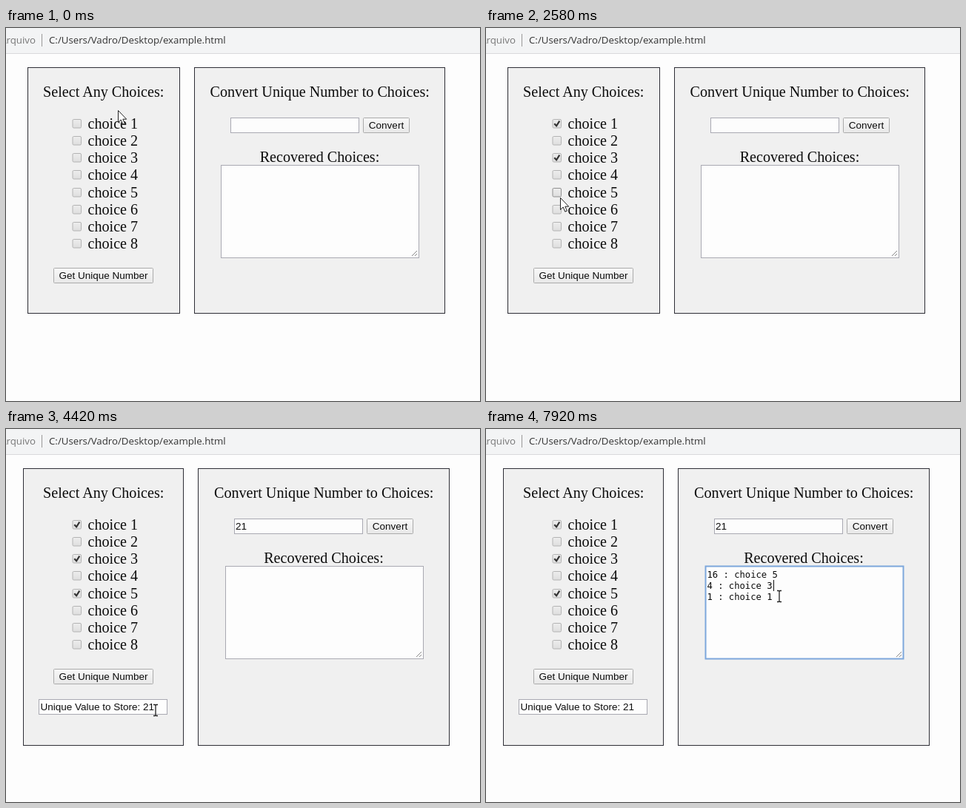
Recreate the animation shown at these times as an HTML page. Size 640x504 px, loop 8000 ms.

```html
<!DOCTYPE html>
<html lang="en">
<head>
<meta charset="utf-8">
<title>Unique number for choices</title>
<style>
  html, body { margin: 0; width: 100%; height: 100%; overflow: hidden; background: #fdfdfd; }
  svg { display: block; width: 640px; height: 504px; }
  text { white-space: pre; fill: #0c0c0c; }
  .serif { font: 20.15px "Liberation Serif", "Times New Roman", serif; }
  .sans { font: 13.5px "Liberation Sans", Arial, sans-serif; }
  .bar { font: 13.25px "Open Sans", "Noto Sans", sans-serif; fill: #333; }
  .mono { font: 12.2px "DejaVu Sans Mono", monospace; }
  .mid { text-anchor: middle; }
  .panel { fill: #f0f0f0; stroke: #2e2e36; }
  .field { fill: #fdfdfd; stroke: #a9a9b2; }
  .field.focus { stroke: #7da7dc; stroke-width: 2; }
  .button { fill: url(#face); stroke: #ababab; }
  .button.hover { stroke: #777; }
  .button.down { fill: #e2e2e2; }
  .box { fill: url(#boxFace); stroke: #b3b3b3; }
  .box.hover { stroke: #8f8f8f; }
  .box.down { fill: #d4d4d4; }
  .tick { fill: none; stroke: #333; stroke-width: 2.2; }
</style>
</head>
<body>
<svg id="stage" viewBox="0 0 640 504" xmlns="http://www.w3.org/2000/svg">
  <defs>
    <linearGradient id="face" x2="0" y2="1">
      <stop stop-color="#f8f8f8"/><stop offset="1" stop-color="#e8e8e8"/>
    </linearGradient>
    <linearGradient id="boxFace" x2="0" y2="1">
      <stop stop-color="#ededed"/><stop offset="1" stop-color="#dedede"/>
    </linearGradient>
  </defs>
</svg>
<script>
const LOOP = 8000, TICK = 1000 / 12;
const stage = document.getElementById('stage');

function add(parent, tag, attrs, content) {
  const node = document.createElementNS(stage.namespaceURI, tag);
  for (const key in attrs) node.setAttribute(key, attrs[key]);
  if (content) node.textContent = content;
  parent.append(node);
  return node;
}
const group = (parent = stage) => add(parent, 'g', {});
const text = (parent, x, y, style, content) => add(parent, 'text', { x, y, class: style }, content);
const path = (parent, d, attrs) => add(parent, 'path', { d, ...attrs });
const rect = (parent, x, y, width, height, style, rx = 0) =>
  add(parent, 'rect', { x, y, width, height, rx, class: style });
const show = (node, on) => node.setAttribute('visibility', on ? 'visible' : 'hidden');
const shift = (node, x, y = 0) => node.setAttribute('transform', `translate(${x} ${y})`);

// Address bar
add(stage, 'rect', { width: 640, height: 34, fill: '#f3f4f5' });
path(stage, 'M0 34.5H640', { stroke: '#d9d9dc' });
add(stage, 'text', { x: 40, y: 21, class: 'bar', 'text-anchor': 'end', style: 'fill:#777' }, 'Arquivo');
path(stage, 'M48.5 8V25', { stroke: '#999' });
text(stage, 58, 21, 'bar', 'C:/Users/Vadro/Desktop/example.html');

// Left panel
const leftPanel = rect(stage, 29.5, 53.5, 205, 332, 'panel');
const rightPanel = rect(stage, 254.5, 53.5, 338, 332, 'panel');
text(stage, 131.7, 93, 'serif mid', 'Select Any Choices:');
const choices = Array.from({ length: 8 }, (_, i) => {
  const y = 123.5 + Math.round(i * 23.15);
  const box = rect(stage, 90, y, 11.5, 11.5, 'box', 1.5);
  const tick = path(stage, `M92.3 ${y + 5.8}l2.8 3 4.2-6.6`, { class: 'tick' });
  text(stage, 110.5, 136 + Math.round(i * 23.15), 'serif', `choice ${i + 1}`);
  return { box, tick, y };
});
const getButton = rect(stage, 64.5, 324.5, 134, 20, 'button', 1);
text(stage, 131.5, 339, 'sans mid', 'Get Unique Number');
const output = group();
rect(output, 44.5, 365.5, 173, 20, 'field');
text(output, 46.5, 380, 'sans', 'Unique Value to Store: 21');

// Right panel
const form = group(), area = group(), labels = group();
text(labels, 423.7, 93, 'serif mid', 'Convert Unique Number to Choices:');
text(labels, 423.5, 180.5, 'serif mid', 'Recovered Choices:');
rect(form, 303.5, 121.5, 173, 20, 'field');
const value = text(form, 305, 136, 'sans', '21');
const convertButton = rect(form, 482.5, 121.5, 62, 20, 'button', 1);
text(form, 513.5, 136, 'sans mid', 'Convert');
const areaBox = rect(area, 290.5, 185.5, 267, 125, 'field');
path(area, 'M548 308l7-7M552 308l3-3', { stroke: '#888' });
const result = group(area);
['16 : choice 5', '4 : choice 3', '1 : choice 1'].forEach((line, i) =>
  text(result, 292.5, 201 + i * 15, 'mono', line));
const caret = path(area, 'M382.5 204V219', { stroke: '#111' });

// Pointers
const arrow = path(stage, 'M.5 .5V16.5L4.2 13 6.8 19.2 9.4 18.1 6.8 12.2H11.7Z',
  { fill: '#fff', stroke: '#222' });
const beam = path(stage, 'M-3-7.5H-1Q0-7.5 0-6.5 0-7.5 1-7.5H3M0-7V7M-3 7.5H-1Q0 7.5 0 6.5 0 7.5 1 7.5H3',
  { fill: 'none', stroke: '#222', 'stroke-width': 1.3 });

// Pointer stops: tick, x, y
const STOPS = [
  [0, 151, 111], [2, 141, 115], [3, 141, 115], [6, 108, 124], [7, 108, 124], [9, 98, 127],
  [12, 97, 128], [20, 93, 175], [21, 94, 176], [24, 94, 176], [32, 101, 236], [34, 101, 236],
  [35, 98, 221], [39, 98, 221], [41, 98, 273], [44, 116, 332], [48, 118, 334], [53, 202, 380],
  [58, 262, 368], [66, 514, 136], [67, 514, 136], [68, 508, 129], [74, 508, 129],
  [83, 397, 210], [87, 397, 210], [95, 396, 226]
];
const CHECKED_AT = { 0: 11, 2: 23, 4: 38 };
const STORED = 47, CONVERTED = 74, FOCUSED = 84;

function pointerAt(tick) {
  const next = STOPS.findIndex(stop => stop[0] > tick);
  if (next < 0) return STOPS.at(-1).slice(1);
  const [t0, x0, y0] = STOPS[next - 1], [t1, x1, y1] = STOPS[next];
  const k = (tick - t0) / (t1 - t0);
  return [Math.round(x0 + (x1 - x0) * k), Math.round(y0 + (y1 - y0) * k)];
}

function draw(time) {
  const tick = Math.min(95, Math.floor((time + 5) / TICK));
  const [x, y] = pointerAt(tick);
  const stored = tick >= STORED, focused = tick >= FOCUSED;
  const over = (left, top, width, height) =>
    x >= left && x <= left + width && y >= top && y <= top + height;

  choices.forEach(({ box, tick: mark, y: top }, i) => {
    show(mark, tick >= CHECKED_AT[i]);
    box.classList.toggle('hover', over(89, top, 13, 13));
    box.classList.toggle('down', tick === CHECKED_AT[i] - 1);
  });

  leftPanel.setAttribute('x', stored ? 23.5 : 29.5);
  leftPanel.setAttribute('width', stored ? 216 : 205);
  rightPanel.setAttribute('x', stored ? 259.5 : 254.5);
  rightPanel.setAttribute('width', stored ? 339 : 338);
  for (const panel of [leftPanel, rightPanel]) panel.setAttribute('height', stored ? 374 : 332);
  shift(form, stored ? 5 : 0);
  shift(area, stored ? 6 : 0);
  shift(labels, stored ? 5.5 : 0);
  show(output, stored);
  show(value, stored);

  getButton.classList.toggle('hover', over(64, 324, 135, 21));
  getButton.classList.toggle('down', tick === STORED - 1);
  convertButton.classList.toggle('hover', over(487, 121, 63, 21));
  convertButton.classList.toggle('down', tick === CONVERTED - 1);
  show(result, tick >= CONVERTED);
  areaBox.classList.toggle('focus', focused);
  show(caret, focused && (tick < 88 || tick >= 94));

  const typing = stored && (over(44, 365, 174, 21) || over(296, 185, 267, 125) || over(308, 121, 174, 21));
  show(arrow, !typing);
  show(beam, typing);
  shift(typing ? beam : arrow, x, y);
}

const start = performance.now();
function frame() {
  draw((performance.now() - start) % LOOP);
  requestAnimationFrame(frame);
}
frame();
</script>
</body>
</html>
```
